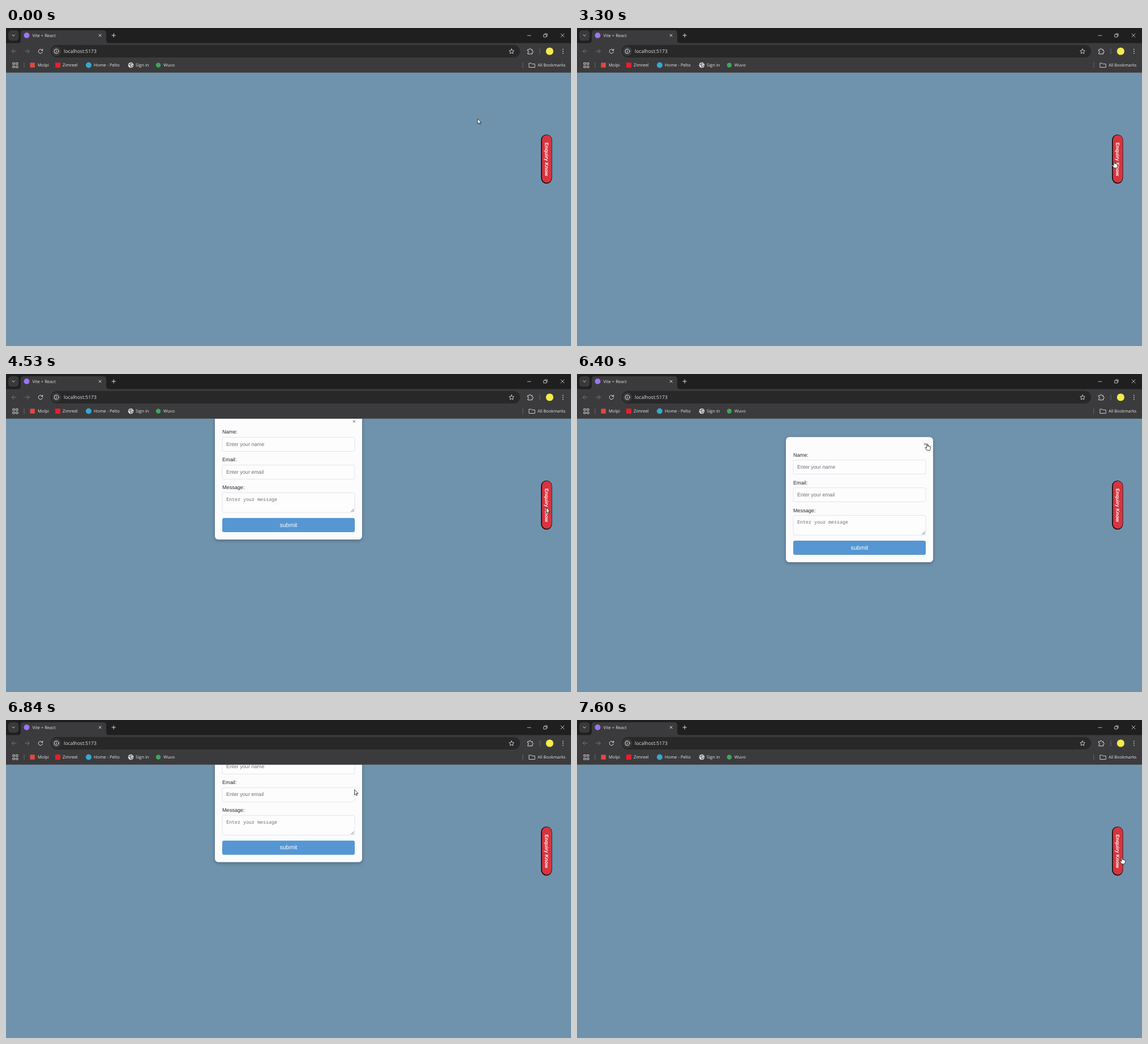
An HTML page for the animation above (8 s loop, 998x561 px).

```html
<!DOCTYPE html>
<html lang="en">
<head>
<meta charset="utf-8">
<title>Enquiry form</title>
<style>
  html, body { margin: 0; width: 100%; height: 100%; overflow: hidden; background: #7093ad; }
  svg { display: block; width: 998px; height: 561px; text-rendering: geometricPrecision; }
  .ui { font: 7.6px "Open Sans", "Noto Sans", sans-serif; fill: #e2e2e2; }
  .line { fill: none; stroke: #dedede; stroke-width: 1; stroke-linecap: round; stroke-linejoin: round; }
  .dim { stroke: #77777a; }
  .form { font: 9.1px "Liberation Sans", Arial, sans-serif; fill: #26282b; }
  .form .hint { fill: #6d7073; }
  .form .mono { font: 8.33px "Noto Sans Mono", "DejaVu Sans Mono", monospace; }
  .field { fill: #fdfdfe; stroke: #dcdfe6; stroke-width: .8; }
  .card { fill: #fcfcfd; filter: drop-shadow(0 2px 3px rgba(0, 0, 0, .28)); }
  .pointer { fill: #fff; stroke: #111; stroke-width: .8; stroke-linejoin: round; }
</style>
</head>
<body>
<svg viewBox="0 0 998 561">
  <defs>
    <clipPath id="page"><rect y="79" width="998" height="482"/></clipPath>
  </defs>
  <rect width="998" height="561" fill="#7093ad"/>

  <!-- enquiry button -->
  <rect x="945" y="188" width="19.5" height="86.5" rx="9.7" fill="#080808"/>
  <rect x="946.6" y="188.7" width="17.2" height="84.2" rx="8.6" fill="#d7343f"/>
  <text transform="translate(951.9 202) rotate(90)" font-family="'Liberation Sans', Arial, sans-serif"
    font-size="8.8" font-weight="bold" fill="#fff">Enquiry Know</text>

  <!-- pop-up form -->
  <g clip-path="url(#page)">
    <g id="popup" class="form">
      <rect class="card" x="369" y="111.3" width="260" height="220.7" rx="6"/>
      <path id="close" d="M613 121.8l3.6 3.6m0-3.6l-3.6 3.6" stroke="#444" stroke-width=".9"/>
      <text x="382" y="145.5">Name:</text>
      <rect class="field" x="382" y="151.7" width="234" height="24.8" rx="3"/>
      <text class="hint" x="389" y="166.6">Enter your name</text>
      <text x="382" y="194.5">Email:</text>
      <rect class="field" x="382" y="200.7" width="234" height="24.8" rx="3"/>
      <text class="hint" x="389" y="215.6">Enter your email</text>
      <text x="382" y="243.5">Message:</text>
      <rect class="field" x="382" y="249.6" width="234" height="34.6" rx="3"/>
      <text class="hint mono" x="389" y="264.3">Enter your message</text>
      <path d="M609.5 283l5-5m-2 5l2-2" stroke="#444" stroke-width=".8"/>
      <rect x="382" y="294" width="234" height="25" rx="3" fill="#5596d3"/>
      <text x="499" y="309.7" text-anchor="middle" style="font-size:10.5px;fill:#fff">submit</text>
    </g>
  </g>

  <!-- browser frame -->
  <rect width="998" height="27" fill="#1f1f1f"/>
  <rect y="26.5" width="998" height="52" fill="#3b3b3d"/>
  <rect y="78" width="998" height="1" fill="#4b4f53"/>
  <path d="M20 27q6 0 6-6V9q0-5 5-5h141q5 0 5 5v12q0 6 6 6z" fill="#3b3b3d"/>
  <rect x="4" y="4" width="18.5" height="18.5" rx="5.5" fill="#39393b"/>
  <rect x="79" y="30" width="829" height="22" rx="11" fill="#282828"/>
  <circle cx="89" cy="41" r="8" fill="#3b3b3d"/>
  <circle cx="36.5" cy="13" r="5" fill="#9b74f2"/>
  <circle cx="960.3" cy="41" r="6.6" fill="#f4eb4c"/>

  <g class="line">
    <path d="M11 12l2.2 2.2L15.4 12M164.2 11l4 4m0-4l-4 4M187 13h6.4m-3.2-3.2v6.4"/>
    <path d="M921 13.3h6M980 10l6 6m0-6l-6 6M950 11.5h4.5v4.5h-4.5zM951.5 10h4.5v4.5" stroke-width=".8"/>
    <path class="dim" d="M18 41h-7.5m3.3-3.4L10.4 41l3.4 3.4M33.7 41h7.5m-3.3-3.4l3.4 3.4-3.4 3.4"/>
    <path d="M64.2 39.2A3.7 3.7 0 1 0 64.6 42M64.8 37.2v2.4h-2.5"/>
    <circle cx="89" cy="41" r="4"/>
    <path d="M89 40.7v2M89 38.9v.1"/>
    <path d="M893 36.9l1.3 2.8 3 .3-2.2 2.1.6 3-2.7-1.6-2.7 1.6.6-3-2.2-2.1 3-.3z" stroke-width=".9"/>
    <path d="M921.8 38h2.4c-.3-2.4 3-2.4 2.7 0h2.6v2.5c2.3-.2 2.3 2.9 0 2.7v2.6h-7.7v-2.5c2.1 0 2.1-2.8 0-2.8z"/>
    <path d="M983.8 37.5v.1M983.8 41v.1M983.8 44.5v.1" stroke-width="1.7"/>
    <path d="M943 36.5v9M32 61v9M912.8 61v9" stroke="#68686b"/>
    <path d="M12.3 61.3h3v3h-3zM18 61.3h3v3h-3zM12.3 67h3v3h-3zM18 67h3v3h-3z" stroke-width=".9"/>
    <path d="M924.2 62h3.4l1.3 1.4h5.2v6h-9.9z" stroke-width=".9"/>
  </g>

  <rect x="42.5" y="61.3" width="8.4" height="8.4" fill="#e4483c"/>
  <rect x="87" y="61" width="9" height="9" fill="#ee1d25"/>
  <circle cx="146" cy="65.5" r="5" fill="#35a9cf"/>
  <circle cx="220.5" cy="65.5" r="4.8" fill="#dedede"/>
  <path d="M216.8 64l3 1 .5 2.5 1 2M219 61.8l1.5 1.7 3-.5M224.5 66l-2.5 1.5" fill="none" stroke="#444" stroke-width="1.1"/>
  <circle cx="269" cy="65.5" r="4.2" fill="#3fa65a"/>

  <g class="ui">
    <text x="46.5" y="15.8">Vite + React</text>
    <text x="102" y="44.3" font-size="8.6" style="font-size:8.6px">localhost:5173</text>
    <text x="56" y="68.2">Molpi</text>
    <text x="100" y="68.2">Zimreel</text>
    <text x="155" y="68.2">Home - Pelto</text>
    <text x="229" y="68.2">Sign in</text>
    <text x="278" y="68.2">Wuvo</text>
    <text x="939" y="68.2" style="font-size:7.4px">All Bookmarks</text>
  </g>

  <path id="pointer" class="pointer"/>
</svg>
<script>
  const LOOP = 8000;
  const $ = id => document.getElementById(id);
  const shapes = {
    arrow: 'M0 0V9.2L2.1 7.3 3.5 10.4 5 9.7 3.6 6.8H6.5Z',
    hand: 'M-.9 .8Q0-.4 .9 .8V4.6Q2-.1 2.7 4.8 4 3.7 4.3 5.3 5.8 4.6 5.8 6.4V8.8L4.6 12H-.4L-3.5 7.7Q-3.6 6.2-2.2 6.6L-.9 7.7Z',
    beam: 'M-2-4.3H-.4L0-4 .4-4.3H2M0-4V4M-2 4.3H-.4L0 4 .4 4.3H2'
  };

  // arrival time, x, y, shape, glide duration before arrival
  const path = [
    [0, 833, 160, 'arrow', 1],
    [830, 900, 333, 'arrow', 330],
    [2370, 925, 256, 'arrow', 40],
    [2900, 938, 250, 'arrow', 30],
    [3300, 949, 235, 'hand', 1],
    [3570, 954.5, 236, 'hand', 170],
    [4200, 954.5, 236, 'arrow', 1],
    [5540, 820, 200, 'arrow', 40],
    [6040, 650, 150, 'arrow', 40],
    [6400, 618.5, 122.8, 'hand', 1],
    [6470, 619, 122.8, 'arrow', 60],
    [6655, 620.3, 128, 'beam', 1],
    [6770, 615.5, 122.8, 'arrow', 1],
    [7600, 962.5, 242, 'hand', 30]
  ];

  const clamp = v => Math.max(0, Math.min(1, v));

  // how far the form sits above its resting place
  function lift(t) {
    if (t < 4170 || t >= 7140) return 300;
    if (t < 4970) return 254 * ((4767 - Math.min(t, 4530)) / 597) ** 2;
    return (0.023 * Math.max(0, t - 6449)) ** 2;
  }

  function draw(now) {
    const t = now % LOOP;
    $('popup').setAttribute('transform', `translate(0 ${-lift(t)})`);
    $('close').style.opacity = t < 6449 ? 1 : 0;

    let [, x, y, shape] = path[0];
    for (const [at, toX, toY, kind, glide] of path) {
      const p = clamp((t - at + glide) / glide);
      x += (toX - x) * p;
      y += (toY - y) * p;
      if (t >= at) shape = kind;
    }
    const pointer = $('pointer');
    pointer.setAttribute('d', shapes[shape]);
    pointer.setAttribute('transform', `translate(${x} ${y})`);
    pointer.style.fill = shape === 'beam' ? 'none' : '#fff';
    requestAnimationFrame(draw);
  }
  requestAnimationFrame(draw);
</script>
</body>
</html>
```
